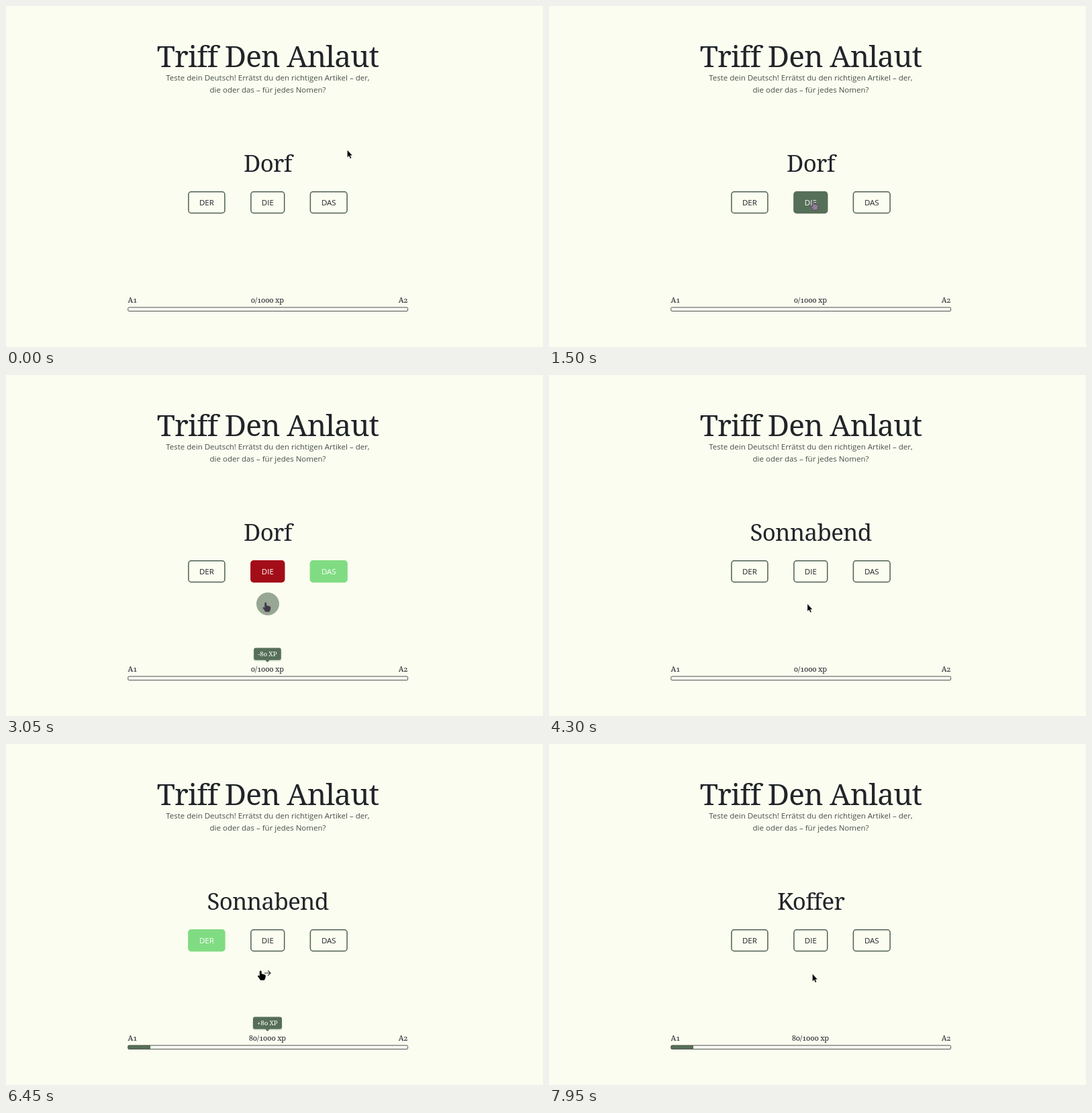
Write an HTML page that moves like this. It is 800 by 508 pixels and loops after 8 s.

```html
<!DOCTYPE html>
<html lang="de">
<head>
<meta charset="utf-8">
<title>Triff Den Anlaut</title>
<style>
  html, body { margin: 0; width: 100%; height: 100%; overflow: hidden; background: #fbfdf0; }
  svg { display: block; width: 100vw; height: 100vh; }
  text { font-family: "Open Sans", "Noto Sans", sans-serif; font-size: 11.5px; fill: #212529; text-anchor: middle; }
  .serif { font-family: "Noto Serif", serif; letter-spacing: -.02em; font-variant-numeric: oldstyle-nums; }
  .title { font-size: 44.3px; }
  .word { font-size: 34.8px; }
  .label { font-size: 11px; }
  .tip { font-size: 9.8px; fill: #fff; }
  .sub { fill: #485048; }
  .start { text-anchor: start; }
  .end { text-anchor: end; }
</style>
</head>
<body>
<svg viewBox="0 0 800 508">
  <text class="serif title" x="390" y="90.5">Triff Den Anlaut</text>
  <text class="sub" x="390" y="110.5">Teste dein Deutsch! Errätst du den richtigen Artikel – der,</text>
  <text class="sub" x="390" y="129">die oder das – für jedes Nomen?</text>
  <text class="serif word" id="word" x="390" y="247"></text>
  <g id="buttons"></g>

  <g id="next">
    <circle id="disc" cx="390" cy="341" r="17" fill="#566f58"/>
    <path id="nextArrow" d="M385 341.3H394M390.2 337.5L394 341.3L390.2 345.1" fill="none" stroke="#212529" stroke-width="1.1"/>
  </g>

  <text class="serif label start" x="181.5" y="442">A1</text>
  <text class="serif label" id="xp" x="389.3" y="442"></text>
  <text class="serif label end" x="598.5" y="442">A2</text>
  <rect x="181.8" y="449" width="416.8" height="5.6" rx="1.5" fill="#fcfef5"/>
  <rect id="bar" x="181.8" y="449" height="5.6" rx="1" fill="#566f58"/>
  <rect x="181.8" y="449" width="416.8" height="5.6" rx="1.5" fill="none" stroke="#4b504b"/>

  <g id="tip">
    <rect id="tipShadow" y="408" height="19" rx="4" fill="#566f58" opacity=".12"/>
    <rect id="tipBox" y="406.5" height="18.2" rx="3" fill="#566f58"/>
    <path d="M386 424.5H393L389.5 428Z" fill="#566f58"/>
    <text class="serif tip" id="tipText" x="389.3" y="418.8"></text>
  </g>

  <g id="cursor">
    <path id="pointer" d="M0 0V11L2.5 8.8L4.2 12.7L6 11.9L4.3 8.2H7.5Z" stroke="#fff" stroke-opacity=".6" stroke-width=".5"/>
    <path id="hand" d="M-1.3 .6Q-.2-.8 .8 .6V5L2.1 4.8L3.4 5.2L4.8 5.5L6.2 6.1Q7.2 6.5 7 8L6.3 11.2L5.2 13.6H-.4L-2.2 10.8L-4 8.4Q-4.4 6.7-2.7 7.2L-1.3 8.4Z" stroke-width=".7"/>
  </g>
</svg>

<script>
const LOOP = 8000;
const DARK = [86, 111, 88], BORDER = [78, 96, 82], PAPER = [251, 253, 240];
const INK = [33, 37, 41], WHITE = [255, 255, 255];
const RED = 'rgb(163,13,24)', GREEN = 'rgb(128,220,130)';

// Each round: word, its end, time of the answer, start of both hovers, result bubble.
const rounds = [
  { word: 'Dorf', end: 3520, answer: 1950, pick: 1, right: 2, hover: 1000, next: 2880, gain: '-80 XP', tipWidth: 40.6 },
  { word: 'Sonnabend', end: 7020, answer: 5525, pick: 0, right: 0, hover: 4800, next: 6450, gain: '+80 XP', tipWidth: 43 },
  { word: 'Koffer', end: LOOP, answer: Infinity, hover: Infinity, next: Infinity }
];

// Mouse stops: time, x, y
const stops = [
  [0, 508.5, 214.5], [300, 508.5, 214.5], [1300, 394, 290.5], [2150, 394, 290.5],
  [2550, 401, 298], [3050, 387, 339], [3300, 385, 341], [4350, 385, 341],
  [5050, 303, 298], [5900, 303, 298], [6450, 379.5, 338], [6750, 392.5, 342.5], [LOOP, 392.5, 342.5]
];

const $ = id => document.getElementById(id);
const ramp = (t, start, length) => Math.min(1, Math.max(0, (t - start) / length));
const smooth = p => p * p * (3 - 2 * p);
const mix = (a, b, p) => `rgb(${a.map((v, i) => Math.round(v + (b[i] - v) * p))})`;
const set = (node, attrs) => { for (const key in attrs) node.setAttribute(key, attrs[key]); };
const show = (node, visible) => set(node, { visibility: visible ? 'visible' : 'hidden' });

function make(tag, attrs) {
  const node = document.createElementNS('http://www.w3.org/2000/svg', tag);
  set(node, attrs);
  return $('buttons').appendChild(node);
}

const buttons = [['DER', 271.9, 54], ['DIE', 364.9, 49.8], ['DAS', 453.4, 54.7]].map(([name, x, width]) => {
  const box = make('rect', { x, y: 276.8, width, height: 31.6, rx: 4, 'stroke-width': 1.5 });
  const label = make('text', { x: x + width / 2, y: 297.3 });
  label.textContent = name;
  return { x, width, box, label };
});

function mouseAt(t) {
  const i = Math.max(1, stops.findIndex(stop => stop[0] > t));
  const [t0, x0, y0] = stops[i - 1], [t1, x1, y1] = stops[i];
  const p = smooth(ramp(t, t0, t1 - t0));
  return [x0 + (x1 - x0) * p, y0 + (y1 - y0) * p];
}

function drawButtons(t, round, answered) {
  buttons.forEach(({ box, label }, i) => {
    const hover = i === round.pick ? ramp(t, round.hover, 150) : 0;
    const result = answered && (i === round.right ? GREEN : i === round.pick ? RED : null);
    const lit = answered ? (result ? 1 : 0) : hover;
    set(box, { fill: result || mix(PAPER, DARK, lit), stroke: result || mix(BORDER, DARK, lit) });
    label.style.fill = mix(INK, WHITE, lit);
  });
}

function drawCursor(t, answered, glow) {
  const [x, y] = mouseAt(t);
  const overButton = y > 276 && y < 309.5 && buttons.some(b => x > b.x && x < b.x + b.width);
  const overNext = answered && Math.hypot(x - 390, y - 341) < 17;
  set($('cursor'), { transform: `translate(${x} ${y})` });
  show($('hand'), overButton || overNext);
  show($('pointer'), !overButton && !overNext);
  const tone = overButton ? 'rgb(146,124,152)' : mix([0, 0, 0], [67, 56, 74], glow);
  set($('hand'), { fill: tone, stroke: overButton ? '#49404f' : tone });
}

function draw(t) {
  const round = rounds.find(r => t < r.end);
  const answered = t >= round.answer;
  const glow = ramp(t, round.next, 160);

  $('word').textContent = round.word;
  drawButtons(t, round, answered);

  show($('next'), answered);
  set($('disc'), { opacity: glow * .6 });
  set($('nextArrow'), { opacity: 1 - glow });

  const scoreTime = rounds[1].answer;
  $('xp').textContent = (t < scoreTime ? 0 : 80) + '/1000 xp';
  const filled = 1 - (1 - ramp(t, scoreTime, 600)) ** 2;
  set($('bar'), { width: 33.3 * filled });

  show($('tip'), answered);
  if (answered) {
    const width = round.tipWidth, x = 389.5 - width / 2;
    set($('tipBox'), { x, width });
    set($('tipShadow'), { x: x - 1, width: width + 2 });
    $('tipText').textContent = round.gain;
  }
  drawCursor(t, answered, glow);
}

const began = performance.now();
function tick() {
  draw((performance.now() - began) % LOOP);
  requestAnimationFrame(tick);
}
tick();
</script>
</body>
</html>
```
